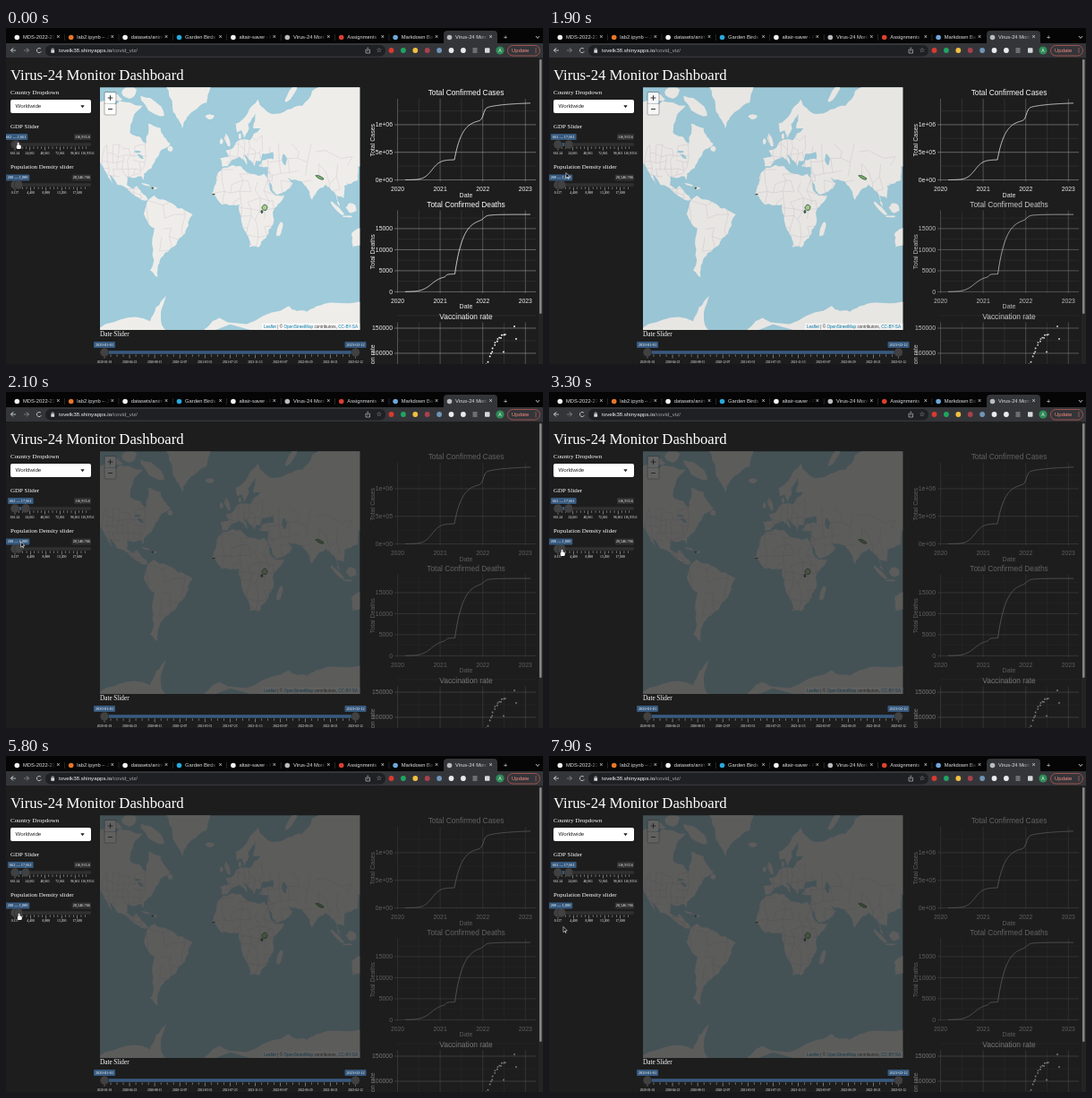
An HTML page with a canvas for the animation above (8000 ms loop, 600 by 375 pixels).

```html
<!DOCTYPE html>
<html lang="en">
<head>
<meta charset="utf-8">
<title>Virus-24 Monitor Dashboard</title>
<style>
html, body { margin: 0; width: 100%; height: 100%; overflow: hidden; background: #1d1d1d; }
canvas { display: block; width: 600px; height: 375px; }
</style>
</head>
<body>
<canvas id="stage"></canvas>
<script>
const W = 600, H = 375, LOOP = 8000, BG = '#1d1d1d', BLUE = '#375a7f', INK = '#d5d7da';
const SANS = '"Liberation Sans", Arial, sans-serif', SERIF = '"Liberation Serif", "Times New Roman", serif';
const scale = Math.max(1, window.devicePixelRatio || 1);
let ctx = setup(document.getElementById('stage'));

function setup(canvas) {
  canvas.width = W * scale;
  canvas.height = H * scale;
  const c = canvas.getContext('2d');
  c.scale(scale, scale);
  return c;
}

// Paints once into its own canvas so it can be faded as a group
function layer(paint) {
  const canvas = document.createElement('canvas'), old = ctx;
  ctx = setup(canvas);
  paint();
  ctx = old;
  return canvas;
}

let seed = 7;
function random() {
  seed = (seed * 16807) % 2147483647;
  return seed / 2147483647;
}
const jitter = size => (random() - 0.5) * 2 * size;

function text(s, x, y, size, color = '#fff', align = 'left', font = SANS) {
  ctx.font = size + 'px ' + font;
  ctx.textAlign = align;
  ctx.textBaseline = 'middle';
  ctx.fillStyle = color;
  ctx.fillText(s, x, y);
}
const serif = (s, x, y, size, align = 'left') => text(s, x, y, size, '#fff', align, SERIF);

function rect(x, y, w, h, color, r = 0) {
  ctx.fillStyle = color;
  ctx.beginPath();
  ctx.roundRect(x, y, w, h, r);
  ctx.fill();
}

function dot(x, y, r, color) {
  ctx.fillStyle = color;
  ctx.beginPath();
  ctx.arc(x, y, r, 0, 7);
  ctx.fill();
}

function line(pts, color = '#fff', width = 0.8) {
  ctx.strokeStyle = color;
  ctx.lineWidth = width;
  ctx.lineJoin = 'round';
  ctx.beginPath();
  for (let i = 0; i < pts.length; i += 2) ctx.lineTo(pts[i], pts[i + 1]);
  ctx.stroke();
}

/* ---------- browser ---------- */
function drawTab(name, color, x) {
  dot(x, 10.5, 2.8, color);
  ctx.save();
  ctx.beginPath();
  ctx.rect(x + 6, 3, 38, 14);
  ctx.clip();
  const fade = ctx.createLinearGradient(x + 34, 0, x + 43, 0);
  fade.addColorStop(0, '#dfe1e5');
  fade.addColorStop(1, 'rgba(223,225,229,0)');
  text(name, x + 6.6, 10.7, 5.8, fade);
  ctx.restore();
  text('×', x + 46, 10.5, 7, '#dfe1e5', 'center');
}

function drawBrowser() {
  rect(0, 0, W, 18, '#050505');
  rect(489, 3, 60, 18, '#343539', 4);
  rect(0, 17, W, 16, '#343539');
  const tabs = [
    ['MDS-2022-23', '#f4f4f4'], ['lab2.ipynb – Ju', '#e8762c'], ['datasets/animal', '#f4f4f4'],
    ['Garden Birds', '#27a9dc'], ['altair-saver · P', '#f4f4f4'], ['Virus-24 Monitor', '#b9bcc0'],
    ['Assignments', '#d9402f'], ['Markdown Basics', '#6fa8dc'], ['Virus-24 Monitor', '#b9bcc0']
  ];
  tabs.forEach(([name, color], i) => {
    drawTab(name, color, 12.3 + i * 60.4);
    if (i < 7) rect(65.3 + i * 60.4, 7, 0.5, 7, '#45474b');
  });
  text('+', 558, 10.3, 8, '#dfe1e5', 'center');
  line([592, 9, 594, 11.5, 596, 9], '#dfe1e5');

  line([11, 25, 5.5, 25, 8, 22.5, 5.5, 25, 8, 27.5], INK);
  line([20, 25, 25.5, 25, 23, 22.5, 25.5, 25, 23, 27.5], '#85878b');
  ctx.strokeStyle = INK;
  ctx.beginPath();
  ctx.arc(37, 25, 2.6, 0.4, 5.6);
  ctx.stroke();
  rect(44, 19, 380, 12.5, '#1f2023', 6);
  rect(50.3, 24.2, 3.8, 3.5, INK, 0.5);
  ctx.beginPath();
  ctx.arc(52.2, 24, 1.2, Math.PI, 0);
  ctx.stroke();
  const host = 'tovelk38.shinyapps.io';
  text(host, 59, 25.2, 6.2, '#f1f3f4');
  text('/covid_viz/', 59 + ctx.measureText(host).width, 25.2, 6.2, '#a4a7ab');

  line([403, 24, 402, 24, 402, 28, 406.5, 28, 406.5, 24, 405.5, 24], INK, 0.6);
  line([404.2, 26, 404.2, 21.5], INK, 0.7);
  text('☆', 417, 25, 7, INK, 'center', '"DejaVu Sans", sans-serif');
  ['#d93a2f', '#1fa463', '#f0c040', '#a9404b', '#6f95b8', '#e8eaed', '#e8eaed'].forEach((color, i) =>
    dot(430.5 + i * 13.4, 25, 2.9, color));
  for (let y = 23; y < 28; y += 2) line([521.5, y, 526.5, y], INK, 0.7);
  rect(535, 22.3, 5.5, 5.4, INK, 0.8);
  dot(552, 25, 4.6, '#2e8b57');
  text('A', 552, 25.2, 5, '#fff', 'center');
  ctx.strokeStyle = '#c85f57';
  ctx.beginPath();
  ctx.roundRect(560.5, 19.5, 36, 11.5, 5.7);
  ctx.stroke();
  text('Update', 565, 25.3, 6, '#f28b82');
  for (let i = -1; i < 2; i++) dot(592, 25 + i * 2, 0.55, '#f28b82');
}

/* ---------- map ---------- */
const WATER = '#9fcbda', LAND = '#efedea';
const lonX = lon => 250.3 + 1.19 * lon;
const latY = lat => 201.7 - 68.2 * Math.log(Math.tan(Math.PI / 4 + lat * Math.PI / 360));
const ground = new Path2D();

// Midpoint displacement turns a few corners into a ragged coast
function ragged(x0, y0, x1, y1, depth) {
  if (!depth) return ground.lineTo(x1, y1);
  const push = jitter(0.13);
  const mx = (x0 + x1) / 2 + (y1 - y0) * push, my = (y0 + y1) / 2 - (x1 - x0) * push;
  ragged(x0, y0, mx, my, depth - 1);
  ragged(mx, my, x1, y1, depth - 1);
}

function coast(...pts) {
  const n = pts.length;
  ground.moveTo(lonX(pts[0]), latY(pts[1]));
  for (let i = 0; i < n; i += 2) {
    const j = (i + 2) % n;
    ragged(lonX(pts[i]), latY(pts[i + 1]), lonX(pts[j]), latY(pts[j + 1]), 3);
  }
  ground.closePath();
}

// Uneven ellipse with half sizes in pixels
function blob(lon, lat, w, h, tilt = 0) {
  const path = new Path2D(), cos = Math.cos(tilt), sin = Math.sin(tilt);
  for (let a = 0; a < 6.2; a += Math.PI / 6) {
    const r = 1 + jitter(0.2), x = Math.cos(a) * w * r, y = Math.sin(a) * h * r;
    path.lineTo(lonX(lon) + x * cos - y * sin, latY(lat) + x * sin + y * cos);
  }
  path.closePath();
  return path;
}
const isle = (...place) => ground.addPath(blob(...place));

function lake(...place) {
  ctx.fillStyle = WATER;
  ctx.fill(blob(...place));
}

function country(color, ...place) {
  const shape = blob(...place);
  ctx.fillStyle = color;
  ctx.fill(shape);
  ctx.strokeStyle = '#1d3a24';
  ctx.lineWidth = 0.7;
  ctx.stroke(shape);
}

// Loose net of crooked borders over a region
function borders(west, south, east, north, step, keep = 0.8) {
  const spot = () => [jitter(step * 0.35), jitter(step * 0.35)];
  const rows = [];
  for (let lat = south; lat <= north; lat += step) {
    const row = [];
    for (let lon = west; lon <= east; lon += step) {
      const [dx, dy] = spot();
      row.push([lonX(lon + dx), latY(lat + dy)]);
    }
    rows.push(row);
  }
  const link = (a, b) => b && random() < keep && line([...a, ...b], '#d2c7d0', 0.5);
  rows.forEach((row, r) => row.forEach((p, c) => {
    link(p, row[c + 1]);
    link(p, rows[r + 1] && rows[r + 1][c]);
  }));
}

function shapeLand() {
  coast(-130,70, -130,52, -124,44, -118,34, -106,22, -94,16, -84,9, -77,8, -83,15, -88,21, -91,18, -97,22, -96,29,
    -83,29, -80,25, -81,31, -70,42, -56,52, -65,60, -77,62, -79,52, -94,58, -82,69);
  coast(-117,33, -110,23, -113,31);
  coast(-77,8, -71,12, -60,8, -50,1, -35,-6, -39,-16, -48,-27, -57,-36, -65,-42, -68,-54, -75,-50, -71,-18, -81,-5);
  coast(-73,78, -54,69, -45,60, -40,65, -22,70, -18,78);
  coast(-6,36, 10,37, 20,31, 32,31, 37,20, 43,12, 51,12, 40,-4, 40,-15, 34,-26, 27,-34, 18,-34, 12,-17, 9,4, -8,4,
    -17,14, -13,28);
  coast(130,77, 90,76, 68,69, 40,66, 26,71, 5,62, 7,58, 11,59, 13,55, 18,60, 17,62, 24,66, 22,60, 29,60, 22,57, 19,54,
    9,54, -4,48, -1,44, -9,43, -8,37, -2,37, 3,42, 9,44, 16,38, 13,45, 23,37, 24,41, 29,41, 31,46, 40,47, 41,42,
    30,41, 27,37, 36,36, 35,30, 43,13, 52,16, 59,23, 49,30, 58,26, 67,25, 73,18, 77,8, 81,15, 90,22, 97,16, 103,2,
    100,13, 107,10, 107,21, 120,26, 120,37, 130,38);
  coast(130,-15, 114,-23, 115,-34, 130,-32);
  coast(-130,-74, -75,-72, -60,-63, -62,-74, -30,-76, -10,-71, 55,-67, 72,-69, 90,-66, 130,-66, 130,-80, -130,-80);
  isle(-79, 22, 5, 1, 0.3);
  isle(-71, 19, 3.3, 1.3);
  isle(-56, 49, 3, 3.5);
  isle(-73, 69, 15, 6, 0.7);
  isle(-109, 71, 8, 6);
  isle(-94, 73, 8, 6);
  isle(-19, 65, 4.5, 2.8);
  isle(-2.5, 54, 2.6, 7, -0.3);
  isle(-8, 53.3, 2.2, 3);
  isle(9.3, 56, 1.5, 3.5);
  isle(58, 73, 3, 12, 0.6);
  isle(46.7, -19, 2.6, 8.5, 0.25);
  isle(101, 0, 10, 2, 0.8);
  isle(114, 1, 6, 6);
  isle(110, -7.3, 5.5, 1);
}

function drawLand() {
  shapeLand();
  ctx.fillStyle = LAND;
  ctx.fill(ground);
  ctx.save();
  ctx.clip(ground);
  borders(-120, 30, -78, 50, 5);
  borders(-104, 9, -84, 20, 5);
  borders(-76, -50, -38, 10, 11, 0.7);
  borders(-14, -32, 44, 32, 8);
  borders(-4, 39, 32, 58, 5.5);
  borders(38, 14, 80, 52, 9, 0.7);
  borders(82, 16, 118, 52, 10, 0.5);
  ctx.restore();
  lake(51, 42, 2.8, 6, -0.2);
  lake(-87, 47, 3.5, 1.3);
  lake(-84, 44, 4, 1.5, 0.6);
  country('#a5d28f', 32.5, 1.4, 2.8, 3.2);
  country('#2d7b49', 29.9, -2.8, 1, 2);
  country('#79b96b', 84, 28.3, 4.8, 1.5, 0.4);
  country('#2d7b49', -72.7, 19, 1, 0.7);
  country('#2d7b49', -15.3, 13.4, 1.4, 0.2);
}

function drawCredit() {
  const parts = [['Leaflet', '#0078a8'], [' | © ', '#333'], ['OpenStreetMap', '#0078a8'],
    [' contributors, ', '#333'], ['CC-BY-SA', '#0078a8']];
  ctx.font = '4.65px ' + SANS;
  let x = 393 - ctx.measureText(parts.map(p => p[0]).join('')).width;
  rect(x - 2, 329.5, 398 - x, 7.5, 'rgba(255,255,255,.7)');
  for (const [s, color] of parts) {
    text(s, x, 333.5, 4.65, color);
    x += ctx.measureText(s).width;
  }
}

function drawMap() {
  ctx.save();
  ctx.beginPath();
  ctx.rect(105, 66.3, 290.3, 270.7);
  ctx.clip();
  rect(105, 66, 291, 271, WATER);
  drawLand();
  rect(109.5, 71, 14, 26.5, 'rgba(0,0,0,.28)', 2);
  rect(110.5, 72, 12, 12, '#fff', 1);
  rect(110.5, 84.5, 12, 12, '#fff', 1);
  line([113.7, 78, 119.3, 78], '#222', 0.9);
  line([116.5, 75.2, 116.5, 80.8], '#222', 0.9);
  line([114, 90.5, 119, 90.5], '#222', 0.9);
  drawCredit();
  ctx.restore();
}

/* ---------- charts ---------- */
const wave = (x, mid, rise, width) => rise / (1 + Math.exp((mid - x) / width));
const surge = (x, start, rise, width) => x < start ? 0 : rise * (1 - Math.exp((start - x) / width));

function curve(base, growth) {
  const pts = [];
  for (let x = 446; x <= 586; x += 0.5) pts.push(x, base - growth(x));
  line(pts, '#fff', 0.75);
}

function drawChart(title, axis, zero, gap, labels, top, bottom) {
  text(title, 514, top - 6.3, 8.4, '#fff', 'center');
  ctx.save();
  ctx.translate(410, (top + bottom) / 2);
  ctx.rotate(-Math.PI / 2);
  text(axis, 0, 0, 7, '#eee', 'center');
  ctx.restore();
  for (let i = 0; i < 7; i++) {
    const x = 437.5 + i * 23.8, major = i % 2 === 0;
    line([x, top, x, bottom], major ? '#8d8d8d' : '#454545', 0.5);
    if (major) text(2020 + i / 2, x, bottom + 8.7, 6.8, '#eee', 'center');
  }
  labels.forEach((label, i) => {
    const y = zero - i * gap;
    line([434, y, 592, y], '#a5a5a5', 0.55);
    line([437, y - gap / 2, 592, y - gap / 2], '#454545', 0.4);
    text(label, 432, y + 0.3, 6.9, '#eee', 'right');
  });
  text('Date', 514, bottom + 15.5, 7, '#eee', 'center');
}

function drawCases() {
  drawChart('Total Confirmed Cases', 'Total Cases', 169.5, 30.8, ['0e+00', '5e+05', '1e+06'], 79, 171.5);
  curve(169.5, x => wave(x, 476, 22.5, 4.5) + surge(x, 501, 45, 8.5) + wave(x, 533.5, 14, 1.2) + surge(x, 537, 5, 28));
}

function drawDeaths() {
  drawChart('Total Confirmed Deaths', 'Total Deaths', 294.4, 23.5, ['0', '5000', '10000', '15000'], 203.5, 296);
  curve(294.4, x => wave(x, 475.5, 17.5, 5.5) + wave(x, 491.5, 2.5, 0.6) + surge(x, 501.5, 62, 9) + wave(x, 534, 4.3, 1.5));
}

function drawVaccines() {
  drawChart('Vaccination rate', 'Vaccination rate', 363, 28, ['100000', '150000'], 328.5, 428);
  for (let i = 0; i < 15; i++) {
    const rise = 32 * Math.sin(i / 14 * Math.PI / 2);
    dot(537 + i * 1.45 + jitter(0.8), 375 - rise + jitter(1.5), 0.95, '#fff');
  }
  dot(568, 333, 0.95, '#fff');
  dot(570, 347, 0.95, '#fff');
  dot(556, 361.5, 0.95, '#fff');
}

/* ---------- controls ---------- */
function tag(s, x, y, align = 'center', color = BLUE, pad = 2) {
  ctx.font = '4.3px ' + SERIF;
  const w = ctx.measureText(s).width + pad * 2;
  const left = align === 'right' ? x - w : x - w / 2;
  rect(left, y - 3.5, w, 7, color, 1);
  serif(s, left + pad, y + 0.2, 4.3);
}

function slider(y, x0, x1, from, to, labels, step, size, drop) {
  rect(x0, y - 1.8, x1 - x0, 3.6, '#303030', 1.5);
  rect(from, y - 1.8, to - from, 3.6, BLUE);
  labels.forEach((s, i) => {
    const x = x0 + 5 + i * step;
    serif(s, Math.min(x, x1 - 4), y + drop, size, 'center');
    for (let k = 0; k < 4 && x + k * step / 4 < x1 - 3; k++)
      rect(x + k * step / 4 - 0.25, y + 2.6, 0.5, k ? 2.2 : 4, '#ccc');
  });
  for (const x of [from, to]) {
    dot(x, y, 5, '#2c2c2c');
    dot(x, y, 4.5, '#414141');
  }
}

const gdpLabels = ['661.24', '24,661', '48,661', '72,661', '96,661', '116,935.6'];
const densityLabels = ['0.137', '4,400', '8,800', '13,200', '17,600'];
const dateLabels = Array.from({ length: 11 }, (_, i) =>
  new Date(Date.UTC(2020, 0, 1) + i * 113.8 * 864e5).toISOString().slice(0, 10));

function drawPage() {
  rect(0, 33, W, H - 33, BG);
  drawBrowser();
  serif('Virus-24 Monitor Dashboard', 5, 53.5, 16.7);
  serif('Country Dropdown', 5, 71.8, 6.95);
  rect(5, 80, 90, 15, '#fff', 2);
  text('Worldwide', 10.5, 87.7, 6.2, '#222');
  ctx.fillStyle = '#222';
  ctx.beginPath();
  ctx.moveTo(83.3, 86.2);
  ctx.lineTo(87.7, 86.2);
  ctx.lineTo(85.5, 89.2);
  ctx.fill();
  serif('GDP Slider', 5, 110.3, 6.95);
  serif('Population Density slider', 5, 155.3, 6.95);
  serif('Date Slider', 105, 342.5, 7.2);
  tag('116,935.6', 95, 121.5, 'right', '#303030', 1);
  tag('20,546.766', 95, 167, 'right', '#303030', 1);
  slider(175, 5, 95, 10, 14, densityLabels, 17.4, 3.8, 9.5);
  tag('200 — 1,000', 13, 167);
  slider(362, 105, 395, 110, 390.5, dateLabels, 28.05, 3.5, 11);
  tag(dateLabels[0], 110, 353.5);
  tag(dateLabels[10], 390.5, 353.5);
  rect(595, 33, 5, H - 33, '#242424');
  rect(596, 35, 2.6, 284, '#858585', 1.3);
}

function drawGdp(value) {
  const x = 10 + (value - 661) / 1417;
  slider(130, 5, 95, 10, x, gdpLabels, 16.8, 3.8, 10);
  tag('662 — ' + value.toLocaleString('en-US'), (10 + x) / 2 + 0.3, 121.5);
}

function drawCursor(x, y, hand) {
  ctx.save();
  ctx.translate(x, y);
  ctx.lineWidth = 0.6;
  if (hand) {
    rect(-1.2, -3.2, 1.5, 5, '#fff', 0.7);
    rect(-2.2, -0.5, 5, 4.5, '#fff', 1.5);
  } else {
    ctx.fillStyle = '#000';
    ctx.strokeStyle = '#fff';
    ctx.beginPath();
    ctx.moveTo(-2, -3.5);
    ctx.lineTo(-2, 2.6);
    ctx.lineTo(-0.4, 1.2);
    ctx.lineTo(0.8, 3.6);
    ctx.lineTo(0.4, 1);
    ctx.lineTo(2.3, 1);
    ctx.closePath();
    ctx.fill();
    ctx.stroke();
  }
  ctx.restore();
}

/* ---------- motion ---------- */
const page = layer(drawPage);
// Each output fades to its busy state: picture, start time, final opacity
const outputs = [
  [layer(drawMap), 1875, 0.3], [layer(drawCases), 1875, 0.3],
  [layer(drawDeaths), 1822, 0.3], [layer(drawVaccines), 1822, 0.42]
];
// Cursor stops: time, x, y
const stops = [[0, 14, 131], [700, 14, 131], [1500, 22, 131], [1600, 22, 131], [1900, 21, 165], [2400, 15, 179],
  [7500, 15, 179], [7900, 18, 194]];
const clamp = v => Math.min(1, Math.max(0, v));
const ease = v => v * v * (3 - 2 * v);

function cursorAt(t) {
  const i = Math.max(1, stops.findIndex(s => s[0] > t));
  if (t >= 7900) return [18, 194];
  const [t0, x0, y0] = stops[i - 1], [t1, x1, y1] = stops[i];
  const k = (t - t0) / (t1 - t0);
  return [x0 + (x1 - x0) * k, y0 + (y1 - y0) * k];
}

function frame(now) {
  const t = now % LOOP;
  ctx.globalAlpha = 1;
  ctx.drawImage(page, 0, 0, W, H);
  for (const [image, start, low] of outputs) {
    ctx.globalAlpha = 1 - (1 - low) * ease(clamp((t - start) / 200));
    ctx.drawImage(image, 0, 0, W, H);
  }
  ctx.globalAlpha = 1;
  drawGdp(2661 + 1000 * Math.round(15 * clamp((t - 700) / 800)));
  const [x, y] = cursorAt(t);
  drawCursor(x, y, t < 1650 || (t >= 2200 && t < 7650));
  requestAnimationFrame(frame);
}
requestAnimationFrame(frame);
</script>
</body>
</html>
```
